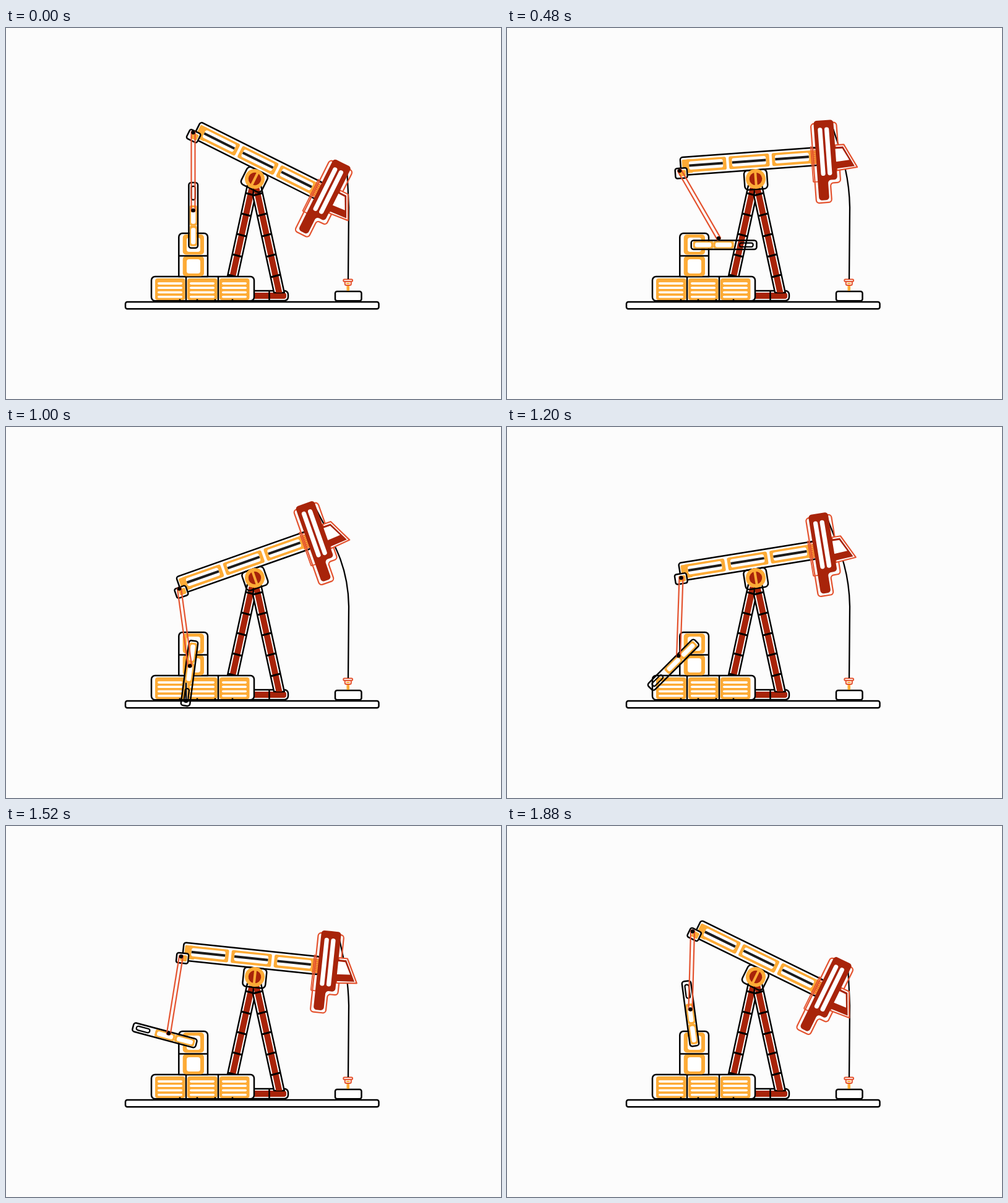
An HTML page with a canvas for the animation above (1920 ms loop, 800 by 600 pixels).

```html
<!DOCTYPE html>
<html lang="en">
<head>
<meta charset="utf-8">
<title>Pump jack</title>
<style>
  html, body { margin: 0; width: 100%; height: 100%; overflow: hidden; background: #fcfcfc; }
  canvas { display: block; }
</style>
</head>
<body>
<canvas id="stage" width="800" height="600"></canvas>
<script>
const ctx = document.getElementById('stage').getContext('2d');
const LOOP = 1920, STEP = 40, RAD = Math.PI / 180;
const BLACK = '#000', WHITE = '#fff', AMBER = '#fdab36', RUST = '#a8240a', CORAL = '#e4532f';
const PIVOT = [402, 244], CRANK = [302.7, 350.8], ROD = 126;

// Pose keys over one loop
const TIMES = [0, 280, 480, 720, 1000, 1200, 1520, 1880];
const BEAM = [26.5, 10.3, -4.2, -16, -19.4, -9.2, 6, 26.1];
const ROD_X = [302.5, 287.5, 279, 279.5, 280, 281.5, 283, 300];
const ROD_Y = [169, 203, 231, 258, 261.5, 244, 211, 170.5];
const ROD_ANGLE = [0, 22.2, 30, 22.9, 7.8, -2, -9.2, -1.6];

// Smooth periodic curve through the keys
function curve(values, t) {
  const n = TIMES.length;
  const time = i => TIMES[(i + n) % n] + Math.floor(i / n) * LOOP;
  const val = i => values[(i + n) % n];
  const slope = i => (val(i + 1) - val(i - 1)) / (time(i + 1) - time(i - 1));
  let i = n - 1;
  while (TIMES[i] > t) i--;
  const h = time(i + 1) - time(i), s = (t - time(i)) / h, r = 1 - s;
  return r * r * (1 + 2 * s) * val(i) + s * s * (3 - 2 * s) * val(i + 1)
    + h * s * r * (r * slope(i) - s * slope(i + 1));
}

function paint(fill, stroke, width = 2.5) {
  if (fill) { ctx.fillStyle = fill; ctx.fill(); }
  if (stroke) { ctx.strokeStyle = stroke; ctx.lineWidth = width; ctx.stroke(); }
}

// Rounded box between two corners
function box(x1, y1, x2, y2, r, fill, stroke, width) {
  ctx.beginPath();
  ctx.roundRect(x1, y1, x2 - x1, y2 - y1, r);
  paint(fill, stroke, width);
}

function poly(points, fill, stroke, width) {
  ctx.beginPath();
  points.forEach(p => ctx.lineTo(...p));
  ctx.closePath();
  paint(fill, stroke, width);
}

function line(x1, y1, x2, y2, color = BLACK, width = 2.5) {
  ctx.beginPath();
  ctx.moveTo(x1, y1);
  ctx.lineTo(x2, y2);
  paint(null, color, width);
}

function disc(x, y, r, fill) {
  ctx.beginPath();
  ctx.arc(x, y, r, 0, 7);
  paint(fill);
}

function turned([x, y], degrees, draw) {
  ctx.save();
  ctx.translate(x, y);
  ctx.rotate(degrees * RAD);
  draw();
  ctx.restore();
}

// One leg of the frame, leaning by side: -1 left, 1 right
function leg(side, foot) {
  const at = (offset, y) => [401 + side * (13 + (y - 302) * 0.218 + offset), y];
  poly([at(8.3, 255), at(8.3, foot), at(-8.3, foot), at(-8.3, 272), at(-3, 255)], WHITE, BLACK);
  poly([at(5, 258), at(5, foot), at(-5, foot), at(-5, 260)], RUST);
  for (let y = 269; y < foot - 5; y += 33) line(...at(-8, y + 2), ...at(8, y - 2), BLACK, 3);
}

function drawFrame() {
  box(380, 425, 456, 441, 6, WHITE, BLACK);
  box(385, 428, 453, 438, 4, RUST);
  line(425.5, 425, 425.5, 441);
  leg(-1, 430);
  leg(1, 428);
}

function drawGround() {
  box(193, 443, 602.5, 454.3, 3, WHITE, BLACK);
  box(532, 426, 574.5, 441.3, 3, WHITE, BLACK);
  box(550.5, 415, 555, 425, 0, AMBER);
  box(547.8, 409, 557.8, 416, 2, WHITE, CORAL, 2);
  box(545.3, 406.5, 560, 410, 1.5, WHITE, CORAL, 2);
  box(550, 412, 555.5, 414, 0, AMBER);
}

function drawHousing() {
  box(235, 402, 401, 441.3, 6, WHITE, BLACK);
  for (const x of [241, 293, 345]) {
    box(x, 405, x + 48.5, 440, 4, AMBER);
    for (let y = 411.3; y < 435; y += 7.2) box(x + 4, y, x + 44, y + 3.6, 1.8, WHITE);
  }
  line(291, 402, 291, 441);
  line(343, 402, 343, 441);
  for (const x of [281, 309, 338, 366]) line(x, 438.5, x, 442);

  ctx.beginPath();
  ctx.roundRect(279.3, 332, 46.7, 70, [6, 6, 0, 0]);
  paint(WHITE, BLACK);
  for (const y of [334, 369]) {
    box(285.7, y, 320, y + 32.5, 5, AMBER);
    box(292, y + 5, 314, y + 28, 4, WHITE);
  }
  line(279, 368.5, 326, 368.5);
}

function drawCrank() {
  for (const y of [-64, -31]) {
    box(-6, y, 6, y + 33, 3, AMBER);
    box(-3.7, y + 3.5, 3.7, y + 30, 3, WHITE);
  }
  box(-7.3, -100.8, 7.3, 5, 4, null, BLACK);
  box(-3.2, -95, 3.2, -73, 3, null, BLACK, 2.2);
}

function drawBeam() {
  box(-119.5, -43.5, 102, -14.5, 4, WHITE, BLACK);
  box(-117, -39.5, -100, -17.5, 2, AMBER);
  for (const x of [-111, -41.3, 28.4]) {
    box(x, -39.5, x + 65.5, -18.5, 3, AMBER);
    box(x + 5, -36, x + 60, -22.5, 3, WHITE);
    line(x + 5.2, -29.3, x + 59.8, -29.3, '#1c1c1c', 4);
  }
  box(90, -39.5, 101, -17, 0, AMBER);
  box(-129, -26, -109.8, -9.8, 3, WHITE, BLACK);
  box(-123, -23, -112, -13, 2, AMBER);
}

function drawBearing() {
  box(-18.5, -14.5, 18.5, 17, 6, null, BLACK);
  disc(0, 0, 16, AMBER);
  disc(0, 0, 10.3, RUST);
  box(-2, -12, 2, 12, 0, AMBER);
}

// Head shape: a wide block with a narrower foot at its left
function headPath(left, top, right, waist, inner, bottom) {
  const middle = (left + right) / 2;
  const corners = [[right, top], [right, waist], [inner, waist], [inner, bottom],
    [left, bottom], [left, top], [middle, top]];
  ctx.beginPath();
  ctx.moveTo(middle, top);
  for (let i = 0; i < 6; i++) ctx.arcTo(...corners[i], ...corners[i + 1], 5);
  ctx.closePath();
}

function drawHead() {
  headPath(95, -82, 136.5, 15.5, 120, 46.5);
  paint(null, CORAL, 2.2);
  line(92.5, -46, 92.5, 12, CORAL, 1.8);
  line(92.5, 12, 104, 12, CORAL, 1.8);
  ctx.setLineDash([1.5, 1.5]);
  line(97, -42, 97, -15, CORAL, 4);
  ctx.setLineDash([]);

  poly([[132, -45], [146, -45], [165, -7], [132, -4]], WHITE, CORAL, 2.2);
  poly([[130, -42], [144.5, -42], [161, -9], [130, -7]], RUST);
  poly([[130, -39], [143, -39], [153, -19.5], [130, -18]], WHITE);

  headPath(99.7, -86.5, 131.7, 10.5, 116.3, 42.5);
  paint(RUST);
  box(105.8, -75, 113, 3, 3.6, WHITE);
  box(116.5, -75, 123.8, 3, 3.6, WHITE);
}

function drawCable(degrees) {
  const c = Math.cos(degrees * RAD), s = Math.sin(degrees * RAD);
  const x = PIVOT[0] + 130 * c + 74 * s, y = PIVOT[1] + 130 * s - 74 * c;
  const drop = 290 - y;
  ctx.beginPath();
  ctx.moveTo(x, y);
  ctx.bezierCurveTo(x + 0.6 * (553.5 - x), y + 0.38 * drop, 553, y + 0.6 * drop, 554, 290);
  ctx.lineTo(553, 406);
  paint(null, BLACK, 2.3);
}

function drawRod() {
  box(-3, -2, 3, ROD + 2, 2, null, CORAL, 2.2);
  disc(0, 0, 3.2, BLACK);
  disc(0, ROD, 3.2, BLACK);
}

function draw(t) {
  const tilt = curve(BEAM, t);
  ctx.fillStyle = '#fcfcfc';
  ctx.fillRect(0, 0, 800, 600);
  ctx.lineJoin = 'round';
  drawFrame();
  drawGround();
  drawHousing();
  turned(CRANK, t / LOOP * 360, drawCrank);
  turned(PIVOT, tilt, drawBeam);
  turned(PIVOT, tilt, drawBearing);
  drawCable(tilt);
  turned(PIVOT, tilt, drawHead);
  turned([curve(ROD_X, t), curve(ROD_Y, t)], -curve(ROD_ANGLE, t), drawRod);
}

const start = performance.now();
function tick() {
  const t = (performance.now() - start) % LOOP;
  draw(Math.floor(t / STEP) * STEP);
  requestAnimationFrame(tick);
}
tick();
</script>
</body>
</html>
```
